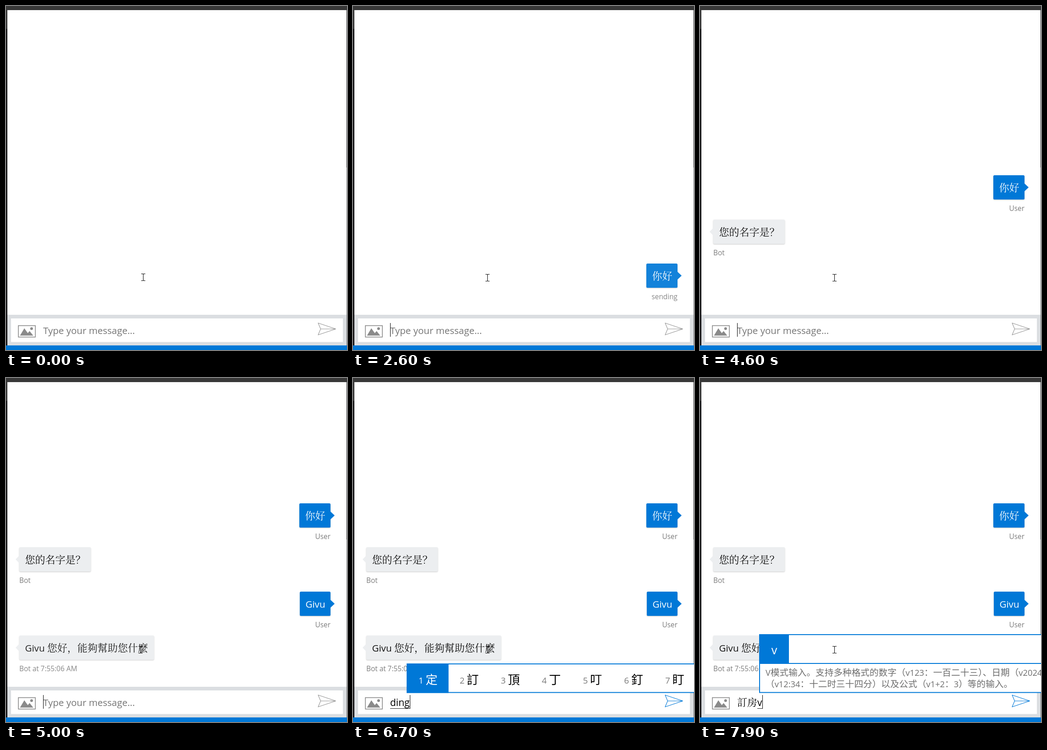
Recreate the animation shown at these times as an HTML page. Size 744 px wide and 752 px high, loop 8 s.

```html
<!DOCTYPE html>
<html lang="zh-CN">
<head>
<meta charset="utf-8">
<title>Chat</title>
<style>
  html, body { margin: 0; width: 100%; height: 100%; overflow: hidden; background: #fff; }
  svg { display: block; width: 744px; height: 752px; }
  text { font-family: "Open Sans", "Noto Sans", sans-serif; white-space: pre; }
  .hei { font-family: "Noto Sans CJK SC", "Noto Sans CJK TC", sans-serif; }
  .song { font-family: "Noto Serif CJK SC", "Noto Sans CJK SC", "Noto Sans CJK TC", serif; font-weight: 300; }
  .bubble { filter: drop-shadow(0 1px 1px rgba(0, 0, 0, .22)); }
</style>
</head>
<body>
<svg id="stage" viewBox="0 0 744 752"></svg>
<script>
const LOOP = 8000, STEP = 100, LEFT = 81;
const BLUE = '#0078d7', GRAY = '#757575';
const SLOTS = [563, 467, 370, 274];

// time, caret x (0 = hidden), committed text, text being composed, candidates
const INPUT = [
  [0, 0], [500, 81], [1000, 0],
  [1400, 93, '', 'n', '你 那 能 年 呢 哪 女'],
  [1600, 99, '', 'ni', '你 妳 呢 尼 泥 逆 擬'],
  [1700, 116, '', "ni'h", '你好 你還 你會 你和 你很 擬'],
  [1800, 127, '', "ni'ha", '你好 你還 你哈 妳好 你喊 擬'],
  [1900, 140, '', "ni'hao", '你好 妳好 你號 擬好 泥好'],
  [2100, 125, '你好'],
  [2400, 81], [2900, 0], [3400, 81],
  [3900, 96, 'G'], [4000, 101, 'Gi'], [4200, 111, 'Giv'], [4300, 124, 'Givu'],
  [4600, 81], [5200, 0], [5600, 81],
  [6000, 94, '', 'd', '的 都 到 對 打 等 點'],
  [6100, 100, '', 'di', '地 第 低 弟 底 敵 帝'],
  [6300, 112, '', 'din', '定 訂 頂 丁 叮 釘 盯'],
  [6700, 124, '', 'ding', '定 訂 頂 丁 叮 釘 盯'],
  [6800, 136, '', "ding'f", '訂房 定分 頂風 定法 頂'],
  [6900, 148, '', "ding'fa", '訂房 定法 頂罰 定發 頂'],
  [7000, 160, '', "ding'fan", '訂房 訂飯 定凡 頂反 頂'],
  [7100, 173, '', "ding'fang", '訂房 盯防 丁方 定房 頂'],
  [7500, 125, '訂房'],
  [7900, 136, '訂房', 'v', 'help']
];

const CHAT = [
  { at: 2400, me: true, w: 68, text: '你好' },
  { at: 2800, w: 156, text: '您的名字是？', clock: '7:55:04 AM' },
  { at: 4600, me: true, w: 67, text: 'Givu' },
  { at: 4800, w: 294, text: 'Givu 您好，能夠幫助您什麼', clock: '7:55:06 AM' }
];

const HELP = [
  'V模式输入。支持多种格式的数字（v123：一百二十三）、日期（v2024',
  '（v12:34：十二时三十四分）以及公式（v1+2：3）等的输入。'
];

const rect = (x, y, w, h, fill, more = '') =>
  `<rect x="${x}" y="${y}" width="${w}" height="${h}" fill="${fill}" ${more}/>`;
const path = (d, attrs) => `<path d="${d}" ${attrs}/>`;

// Latin letters are set slightly smaller than the Chinese ones beside them.
function text(s, x, y, size, fill, cjk = 'hei', anchor = 'start') {
  const body = s.replace(/[^\x00-\xff]+/g,
    m => `<tspan class="${cjk}" font-size="${size}">${m}</tspan>`);
  return `<text x="${x}" y="${y}" font-size="${size * .932}" fill="${fill}" text-anchor="${anchor}">${body}</text>`;
}

function frame() {
  return rect(0, 0, 744, 752, '#fff') + rect(0, 0, 744, 9, '#383838') +
    rect(0, 9, 3, 41, '#3a3a3a') + rect(0, 50, 3, 692, '#1c1c1e') +
    rect(743, 9, 1, 344, '#2b2b2d') + rect(743, 353, 1, 389, '#77797b') +
    rect(3, 675, 740, 67, '#dbdee1') + rect(11, 683, 724, 51.5, '#fff') +
    rect(0, 742, 744, 10, BLUE);
}

function message(m, i, t, count) {
  const y = SLOTS[count - 1 - i], last = i === count - 1;
  const x = m.me ? 708 - m.w : 29, fill = m.me ? BLUE : '#eceef0';
  const p = Math.min(1, (t - m.at) / 250);
  const nib = m.me ? `M707.5 ${y + 17.5}l9.5 9l-9.5 9z` : `M29.5 ${y + 17.5}l-8.5 9l8.5 9z`;
  const label = m.me ? (last ? 'sending' : 'User') : (last ? 'Bot at ' + m.clock : 'Bot');
  return `<g opacity="${1 - Math.pow(1 - p, 1.57)}">` +
    rect(x, y, m.w, 53, fill, 'rx="2.5" class="bubble"') +
    path(nib, `fill="${fill}"`) +
    text(m.text, x + 12.5, y + 35, 22, m.me ? '#fff' : '#111', 'song') +
    text(label, m.me ? 708 : 29, y + 78, 16.5, '#7d7d7d', 'hei', m.me ? 'end' : 'start') + '</g>';
}

function icons(active) {
  return rect(27, 698.7, 37, 25, 'none', 'stroke="#8a8a8a" stroke-width="1.6"') +
    path('M30.5 720.5L40 704.5L47.5 715L51.5 710.5L59.5 720.5z', 'fill="#8a8a8a"') +
    '<circle cx="55.8" cy="705.3" r="3" fill="#8a8a8a"/>' +
    path('M681 693L719.5 706L681 719L686.5 706zM686.5 706H719.5',
      `fill="none" stroke="${active ? BLUE : '#949494'}" stroke-width="1.1" stroke-linejoin="round"`);
}

function candidates(left, list) {
  const words = list.split(' ');
  const step = w => 63.7 + 26 * w.length;
  let x = left;
  let out = rect(left, 624, 744 - left, 64.5, BLUE) + rect(left + 2, 626, 744 - left, 60.5, '#fff') +
    rect(left, 624, step(words[0]) + 1.8, 64.5, BLUE);
  words.forEach((w, i) => {
    out += text(String(i + 1), x + 26, 668, 20, i ? '#7a7a7a' : '#fff') +
      text(w, x + 41.5, 669, 26, i ? '#000' : '#fff');
    x += step(w);
  });
  if (words.length > 6) {
    out += rect(x + 2, 624, 2, 64, BLUE) +
      `<circle cx="${x + 31}" cy="657" r="11" fill="none" stroke="#111" stroke-width="1.8"/>`;
  }
  return out;
}

function help(left) {
  return rect(left, 560, 744 - left, 128.5, BLUE) +
    rect(left + 2, 562, 744 - left, 61, '#fff') + rect(left + 2, 625, 744 - left, 61.5, '#fff') +
    rect(left, 560, 65, 64, BLUE) + text('v', left + 33, 604, 27, '#fff', 'hei', 'middle') +
    HELP.map((s, i) => text(s, left + 14, 650.5 + i * 25.5, 19.65, '#6e6e6e')).join('');
}

function inputLine([, caret, done = '', comp = '', list]) {
  let out = icons(done || comp);
  if (!done && !comp) out += text('Type your message...', LEFT, 717, 22, GRAY);
  if (done) out += text(done, LEFT, 717, 22, '#000', 'song');
  if (comp) {
    const x = LEFT + done.length * 22;
    out += text(comp, x, 717, 22.5, '#000') + rect(x, 722, caret - x, 1, '#222');
  }
  if (caret) out += rect(caret, 693, 1, 30, '#000');
  if (list) out += list === 'help' ? help(caret - 7) : candidates(caret - 7, list);
  return out;
}

function pointer(t) {
  const k = Math.min(1, t / 200), x = Math.round(299 - 6 * k), y = Math.round(585 + k);
  return path(`M${x - 4} ${y + .5}h3.5l1 1l1-1h3.5M${x + .5} ${y + 1}v14M${x - 4} ${y + 15.5}h3.5l1-1l1 1h3.5`,
    'fill="none" stroke="#111" stroke-width="1.1"');
}

function draw(t) {
  const seen = CHAT.filter(m => m.at <= t);
  const state = INPUT.filter(s => s[0] <= t).pop();
  return frame() + seen.map((m, i) => message(m, i, t, seen.length)).join('') +
    inputLine(state) + pointer(t);
}

const stage = document.getElementById('stage');
const start = performance.now();
let shown = -1;

function tick(now) {
  const t = Math.floor(Math.max(0, now - start) % LOOP / STEP) * STEP;
  if (t !== shown) stage.innerHTML = draw(shown = t);
  requestAnimationFrame(tick);
}
tick(start);
</script>
</body>
</html>
```
